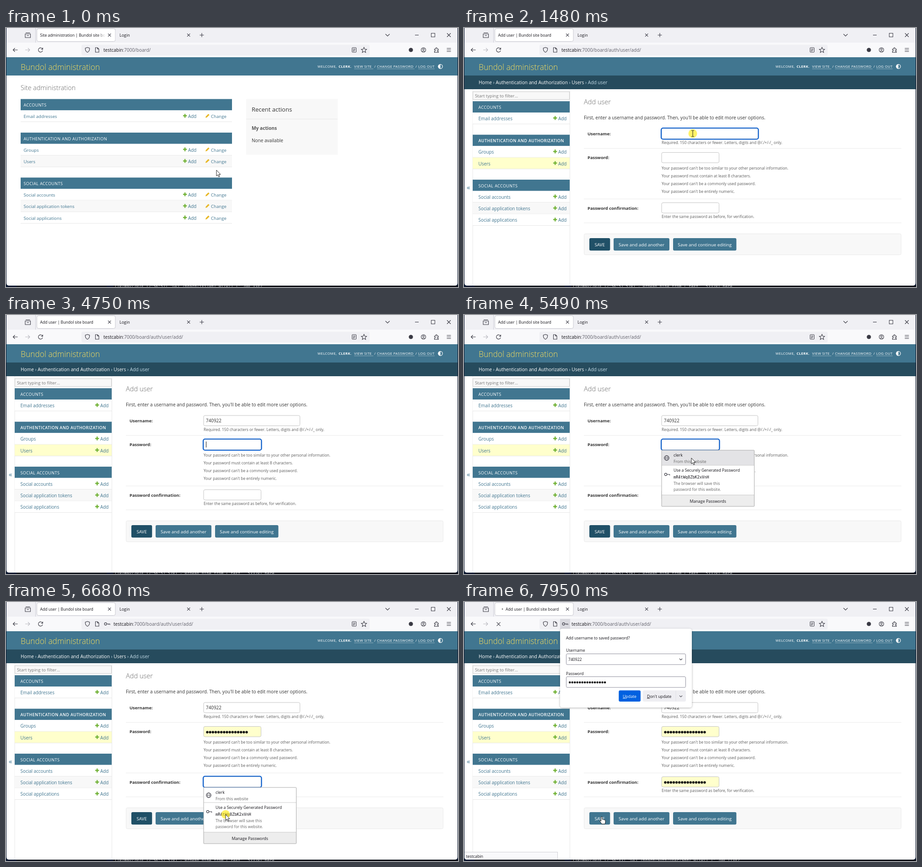
An HTML page that plays this animation: 988x567 px, repeating every 8 s.

```html
<!DOCTYPE html>
<html lang="en">
<head>
<meta charset="utf-8">
<title>Add user</title>
<style>
html, body { margin: 0; width: 100%; height: 100%; overflow: hidden; background: #0b1830; }
svg { display: block; width: 988px; height: 567px; font-family: "Open Sans", "Noto Sans", sans-serif; }
text { white-space: pre; }
.caps { letter-spacing: .38px; }
.mono { font-family: "DejaVu Sans Mono", monospace; }
</style>
</head>
<body>
<svg id="stage" viewBox="0 0 988 567"></svg>
<script>
const LOOP = 8000;
const BLUE = '#417690', DARK = '#264b5d', INK = '#333', ICON = '#3a3a44', FOCUS = '#0a5fd0';
const HOST = 'testcabin', USER = 'clerk', BRAND = 'Bundol', NEW_USER = '740922';

// Markup helpers
const text = (x, y, s, size = 10, fill = INK, attrs = '') =>
  `<text x="${x}" y="${y}" font-size="${size}" fill="${fill}" ${attrs}>${s}</text>`;
const rect = (x, y, w, h, fill, attrs = '') =>
  `<rect x="${x}" y="${y}" width="${w}" height="${h}" fill="${fill}" ${attrs}/>`;
const line = (d, stroke = ICON, width = 1.1, attrs = '') =>
  `<path d="${d}" fill="none" stroke="${stroke}" stroke-width="${width}" ${attrs}/>`;
const ring = (x, y, r, attrs = '') =>
  `<circle cx="${x}" cy="${y}" r="${r}" fill="none" stroke="${ICON}" stroke-width="1.1" ${attrs}/>`;
const group = (id, ...parts) => `<g id="${id}">${parts.join('')}</g>`;
const cross = (x, y, r = 3.2) => line(`M${x - r} ${y - r}l${2 * r} ${2 * r}m0 ${-2 * r}l${-2 * r} ${2 * r}`);
const chevron = (x, y, r = 4) => line(`M${x - r} ${y - r / 2}l${r} ${r}l${r} ${-r}`);
const bold = 'font-weight="700"', light = 'font-weight="300"', middle = 'text-anchor="middle"';

const dots = (x, y, gap, r) => Array.from({ length: 15 }, (_, i) =>
  `<circle cx="${x + i * gap}" cy="${y}" r="${r}" fill="#111"/>`).join('');

const url = path => `<tspan fill="#15141a">${HOST}</tspan>:7000/board/${path}`;

function browserChrome() {
  return [
    rect(1, 0, 986, 32, '#f0f0f4'), rect(1, 32, 986, 32, '#f9f9fb'),
    line('M64.5 0V32', '#cfcfd8', 1),
    rect(67.5, 1.5, 171.5, 28, '#fff', 'rx="3.5" stroke="#c8c8d0" stroke-width="1"'),
    rect(69, 2.5, 1, 26, '#cfe6ff', 'id="burst"'),
    group('tabIndex', text(74.5, 19, `Site administration | ${BRAND} site board`, 8.6, '#15141a'),
      rect(200, 5, 18, 22, 'url(#fade)'), rect(218, 5, 20, 22, '#fff'), rect(239.5, 5, 8, 22, '#f0f0f4')),
    group('tabForm', text(74.5, 19, `Add user | ${BRAND} site board`, 8.6, '#15141a')),
    group('tabLoading', '<circle cx="84" cy="15.5" r="1.4" fill="#777"/>',
      text(91, 19, `Add user | ${BRAND} site board`, 8.6, '#15141a')),
    text(248, 19, 'Login', 9, '#15141a'),
    cross(226.2, 15.5), cross(399.2, 15.5), line('M423.5 15.5h9M428 11v9'),
    line('M43 10.5h9.5M42 13h11.5v8h-11.5zM45.5 16.5h4.5'),
    chevron(834, 15.5, 4.5), line('M894 15.5h8'), rect(929.5, 11.5, 8, 8, 'none', `stroke="${ICON}"`), cross(968, 15.5, 4),
    line('M25.5 48H15.5M19.5 44L15.5 48L19.5 52'),
    line('M42 48H52M48 44L52 48L48 52', '#b9b9c0'),
    group('reload', line('M79.8 46.3A4.7 4.7 0 1 0 80 49.3M80.3 43v3.8h-3.8')),
    group('stop', cross(75.5, 48.3, 4)),
    rect(165, 36.5, 630, 23.5, '#f0f0f4', 'rx="3.5"'),
    line('M178 42.5l4.7 1.7q.2 6.8-4.7 9q-4.9-2.2-4.7-9z'),
    line('M195.5 43h4.5l3 3v7h-7.5zM200 43v3h3'),
    rect(210, 37, 22, 22, '#d9d9df', 'id="keyBack"'),
    group('key', ring(217.7, 48, 2.6), line('M220.3 48h6.7v2.3M224 48v2')),
    text(213, 52.3, '', 10, '#62626c', 'id="url"'),
    rect(756.5, 43, 9, 10, 'none', `stroke="${ICON}" rx="1"`), line('M758.5 46h5M758.5 48.2h5M758.5 50.4h3'),
    line('M782.5 42.3l1.7 3.9 4.2.4-3.2 2.8 1 4.2-3.7-2.2-3.7 2.2 1-4.2-3.2-2.8 4.2-.4z'),
    '<circle cx="885" cy="48" r="4.6" fill="#3a3a44"/>',
    ring(912.5, 48, 5), ring(912.5, 46.5, 1.8), line('M909.3 51.6q3.2-2.6 6.4 0'),
    line('M936.5 46h3q-.8-3 1.3-3t1.3 3h3v3q-2.6-.5-2.6 1.2t2.6 1.2v2.1h-8.6v-2.6q2.3.2 2.3-1.4t-2.3-1.4z'),
    line('M963.5 44.5h9M963.5 48h9M963.5 51.5h9'),
  ].join('');
}

function siteHeader() {
  const small = (x, s, attrs = '') => text(x, 87, s, 7.7, '#fff', `class="caps" ${attrs}`);
  return [
    rect(1, 64, 986, 40, BLUE),
    text(32, 92, `${BRAND} administration`, 17.4, '#f5dd5d', light),
    small(681, 'WELCOME,'), small(727, `${USER.toUpperCase()}.`, bold), small(761, 'VIEW SITE'), small(805, '/'),
    small(811, 'CHANGE PASSWORD'), small(895, '/'), small(901, 'LOG OUT'),
    line('M761 89.5h42M811 89.5h82M901 89.5h36', '#9db9c6', .8),
    '<circle cx="949.5" cy="84.3" r="4.7" fill="none" stroke="#fff" stroke-width="1.2"/>',
    '<path d="M949.5 79.6a4.7 4.7 0 0 0 0 9.4z" fill="#fff"/>',
  ].join('');
}

function module(x, y, width, title, names, { inset, addX, change, current }) {
  let out = rect(x, y, width, 24.7, BLUE) +
    text(x + inset, y + 16.6, title, 9.05, '#fff', `class="caps" ${current ? 'font-weight="600"' : ''}`);
  names.forEach((name, i) => {
    const top = y + 24.7 + i * 25.35, base = top + 17;
    const fill = current === name ? '#ffffcc' : i % 2 ? '#f8f8f8' : '#fff';
    out += rect(x, top, width, 25, fill) + line(`M${x} ${top + 25}h${width}`, '#e6e6e6', 1) +
      text(x + inset, base, name, change ? 9.7 : 9.9, BLUE, change ? 'font-weight="500"' : '') +
      line(`M${addX - 11} ${base - 5}h8.4M${addX - 6.8} ${base - 9.2}v8.4`, '#6aae2c', 2.3) +
      text(addX, base, 'Add', 9.9, BLUE);
    if (change) out += `<path d="M436 ${base - .6}l.9-3.2 5.4-5.4 2.4 2.3-5.5 5.4z" fill="#e8b827"/>` +
      text(448, base, 'Change', 9.6, BLUE);
  });
  return out;
}

function modules(x, tops, width, options, current) {
  return module(x, tops[0], width, 'ACCOUNTS', ['Email addresses'], options) +
    module(x, tops[1], width, 'AUTHENTICATION AND AUTHORIZATION', ['Groups', 'Users'], { ...options, current }) +
    module(x, tops[2], width, 'SOCIAL ACCOUNTS',
      ['Social accounts', 'Social application tokens', 'Social applications'], options);
}

function indexPage() {
  return group('indexPage',
    text(32, 136, 'Site administration', 14.3, '#666', light),
    modules(32, [155.5, 229, 327.4], 462, { inset: 6.5, addX: 398, change: true }),
    rect(525, 155.5, 200, 122, '#f8f8f8'), line('M525 199.3h200', '#e8e8e8', 1),
    text(537, 183, 'Recent actions', 13, INK), text(537, 223.3, 'My actions', 10.2, '#555', bold),
    text(537, 250.3, 'None available', 10));
}

const field = (id, y, width) =>
  rect(432, y + .5, width, 22.5, '#fff', `id="${id}Box" rx="3" stroke="#c4c4c4"`) +
  rect(431, y - .5, width + 2, 24.5, 'none', `id="${id}Focus" rx="4" stroke="${FOCUS}" stroke-width="2.2"`);
const button = (x, width, label, id = '') =>
  rect(x, 460, width, 27.3, BLUE, `rx="3" id="${id}"`) + text(x + width / 2, 478, label, 9.8, '#fff', middle);

function formPage() {
  const label = (y, s) => text(270, y, s, 9.4, INK, bold);
  const help = (y, s) => text(432, y, s, 8.45, '#5c5c5c');
  return group('formPage',
    rect(1, 104, 986, 30, DARK),
    text(32, 123.2, 'Home <tspan fill="#c4dce8">›</tspan> Authentication and Authorization <tspan fill="#c4dce8">›</tspan> Users <tspan fill="#c4dce8">› Add user</tspan>', 10.2, '#fff'),
    line('M19 134V564M231.5 134V564', '#e8e8e8', 1),
    text(6, 354, '«', 15, BLUE),
    rect(19.5, 139.5, 211, 17, '#f8f8f8', 'stroke="#ccc"'), text(24, 151.8, 'Start typing to filter...', 9.6, '#757575'),
    modules(19, [160.3, 233.6, 332], 212, { inset: 12.5, addX: 206 }, 'Users'),
    text(262, 167, 'Add user', 14.6, '#666', light),
    text(262, 200, "First, enter a username and password. Then, you'll be able to edit more user options.", 10.05),
    label(235, 'Username:'), label(287.3, 'Password:'), label(397.6, 'Password confirmation:'),
    help(254, 'Required. 150 characters or fewer. Letters, digits and @/./+/-/_ only.'),
    ["Your password can't be too similar to your other personal information.",
      'Your password must contain at least 8 characters.',
      "Your password can't be a commonly used password.",
      "Your password can't be entirely numeric."].map((s, i) => help(310 + i * 16.9, s)).join(''),
    help(416, 'Enter the same password as before, for verification.'),
    line('M262 263.8H956M262 374.2H956M262 426.6H956', '#eaeaea', 1),
    field('user', 219.5, 210.5), field('pass', 272, 125.5), field('confirm', 382, 125.5),
    text(437, 235, '', 9.9, INK, 'id="typed"'),
    group('passDots', dots(440, 285, 6.14, 2.7)), group('confirmDots', dots(440, 395, 6.14, 2.7)),
    rect(437, 224, 1, 13, '#111', 'id="caret"'),
    rect(262.5, 450.5, 693, 46, '#f8f8f8', 'rx="3" stroke="#eaeaea"'),
    button(274, 45.3, 'SAVE', 'save'), button(327, 122, 'Save and add another'), button(457, 138.4, 'Save and continue editing'));
}

// Suggestion list below a field; rows are stacked in the given order.
function dropdown(id, top, width, rows) {
  const heights = { login: 33, generate: 65, manage: 25 };
  const total = rows.reduce((sum, row) => sum + heights[row], 0);
  let out = rect(432, top, width, total, '#fff'), y = top;
  for (const row of rows) {
    if (row === 'login') out += rect(432.5, y, width - 1, 33, '#e3e3e6', `id="${id}Hover"`) +
      ring(443, y + 17, 5.2) + `<ellipse cx="443" cy="${y + 17}" rx="2.3" ry="5.2" fill="none" stroke="${ICON}" stroke-width=".8"/>` +
      line(`M438 ${y + 17}h10`, ICON, .8) +
      text(458, y + 13.7, USER, 9, '#15141a') + text(458, y + 27.5, 'From this website', 8.7, '#666');
    if (row === 'generate') out += line(`M432 ${y}h${width}`, '#ccc', 1) +
      ring(441, y + 20, 2.6) + line(`M443.6 ${y + 20}h6v2.3`) +
      text(458, y + 14, 'Use a Securely Generated Password', 8.7, '#15141a') +
      text(458, y + 29, 'mR4tWq8ZbK2xVnH', 8.6, '#15141a', 'class="mono"') +
      text(458, y + 43, 'The browser will save this', 8.5, '#666') + text(458, y + 56, 'password for this website.', 8.5, '#666');
    if (row === 'manage') out += rect(432, y, width, 25, '#ededed') + line(`M432 ${y}h${width}`, '#c8c8c8', 1) +
      text(432 + width / 2, y + 16.7, 'Manage Passwords', 8.9, '#15141a', middle);
    y += heights[row];
  }
  return group(id, out, rect(432, top, width, total, 'none', 'stroke="#a9a9a9" rx="1"'));
}

function savePrompt() {
  const box = y => rect(223.5, y, 261, 23.5, '#fff', 'rx="2.5" stroke="#8f8f9d"');
  return group('prompt',
    rect(210, 58.5, 288, 172.5, '#fff', 'rx="5" filter="url(#shadow)"'),
    text(223, 81.6, 'Add username to saved password?', 8.6, '#15141a', 'font-weight="500"'),
    text(223, 109.3, 'Username', 8.6, '#15141a'), box(113.5), text(228, 129, NEW_USER, 8.6, '#15141a'), chevron(474, 125.5, 3),
    text(223, 159.5, 'Password', 8.6, '#15141a'), box(163.5), dots(231.3, 176, 5.48, 2.3),
    rect(338.3, 193.5, 47.7, 24.5, '#0061e0', 'rx="3"'),
    text(362, 209.5, '<tspan text-decoration="underline">U</tspan>pdate', 8.8, '#fff', middle),
    rect(391, 193.5, 94, 24.5, '#eeeef2', 'rx="3"'), line('M463 194v23.5', '#e0e0e6', 1),
    text(400, 209.5, '<tspan text-decoration="underline">D</tspan>on\'t update', 8.8, '#15141a', 'font-weight="500"'),
    chevron(474, 206.3, 3));
}

const stage = document.getElementById('stage');
stage.innerHTML = `<defs>
  <linearGradient id="fade"><stop stop-color="#fff" stop-opacity="0"/><stop offset="1" stop-color="#fff"/></linearGradient>
  <filter id="shadow" x="-10%" y="-10%" width="120%" height="125%"><feDropShadow dx="0" dy="1" stdDeviation="2" flood-opacity=".3"/></filter>
  <clipPath id="window"><path d="M1 0H987V558q0 6-6 6H7q-6 0-6-6z"/></clipPath></defs>` +
  rect(0, 0, 988, 567, '#0b1830') + rect(23, 564, 197, 3, '#15181f') + rect(234, 564, 754, 3, '#0c0f18') +
  text(237, 569, '', 8.8, '#b8b8b8', 'class="mono" id="log"') +
  `<g clip-path="url(#window)">${rect(1, 0, 986, 564, '#fff')}${browserChrome()}${siteHeader()}${indexPage()}${formPage()}` +
  dropdown('userList', 242.5, 210.5, ['login', 'manage']) +
  dropdown('manageList', 243, 210.5, ['manage']) +
  dropdown('passList', 296, 202.5, ['login', 'generate', 'manage']) +
  dropdown('confirmList', 406, 202.5, ['login', 'generate', 'manage']) +
  savePrompt() +
  group('status', rect(.5, 547.5, 204, 18, '#f9f9fb', 'stroke="#cfcfd4"'), text(4.5, 560, HOST, 8.8, '#15141a')) + '</g>' +
  '<circle id="halo" r="9.5" fill="#ffea00" fill-opacity=".6"/>' +
  group('arrow', '<path d="M0 0V13L3 10.3L5 15L7.1 14L5.1 9.6H9Z" fill="#fff" stroke="#111" stroke-width=".9"/>') +
  group('hand', '<path d="M-1.3 1.3a1.3 1.3 0 0 1 2.6 0V6q2-.8 2.4.6q1.8-.6 2.3.6q1.9-.4 2 1.4V12q0 2-1.2 4H.2L-4 9.8q-.6-1.6 1-1.6L-1.3 9.6Z" fill="#fff" stroke="#111" stroke-width=".9"/>') +
  group('beam', line('M-2.8-6.5h2.2L0-6l.6-.5h2.2M0-6V6M-2.8 6.5h2.2L0 6l.6.5h2.2', '#222', 1));

const el = {};
stage.querySelectorAll('[id]').forEach(node => { el[node.id] = node; });
const show = (id, on) => el[id].setAttribute('display', on ? 'inline' : 'none');
const set = (id, attrs) => { for (const k in attrs) el[id].setAttribute(k, attrs[k]); };
const within = (t, ...spans) => spans.some(([a, b]) => t >= a && t < b);

// Pointer stops: time, x, y
const PATH = [[70, 460, 311], [420, 404, 293], [700, 404, 293], [870, 407, 296], [940, 407, 296], [1280, 500, 231],
  [5290, 500, 231], [5490, 497, 313], [5630, 497, 313], [5770, 492, 350], [5860, 492, 350], [6120, 487, 391.5],
  [6250, 487, 391.5], [6560, 480, 465], [6780, 480, 465], [7290, 301, 470]];
// Number of typed characters from each time on
const KEYS = [[0, 0], [2680, 1], [2890, 2], [3160, 3], [3430, 2], [3500, 3], [3790, 4], [3950, 5], [4090, 6]];

function pointerAt(t) {
  const next = PATH.findIndex(p => p[0] > t);
  if (next === 0) return PATH[0].slice(1);
  if (next < 0) return PATH.at(-1).slice(1);
  const [t0, x0, y0] = PATH[next - 1], [t1, x1, y1] = PATH[next];
  const u = (t - t0) / (t1 - t0), e = u * u * (3 - 2 * u);
  return [x0 + (x1 - x0) * e, y0 + (y1 - y0) * e];
}

function render(t) {
  const form = t >= 670, loading = t >= 7680, saved = t >= 5840, confirmed = t >= 6740;
  show('indexPage', !form); show('formPage', form);
  show('tabIndex', !form); show('tabForm', form && !loading); show('tabLoading', loading);
  show('reload', !loading); show('stop', loading);
  show('key', saved); show('keyBack', t >= 7820); show('prompt', t >= 7820); show('status', loading);
  el.url.innerHTML = url(form ? 'auth/user/add/' : '');
  set('url', { x: saved ? 235 : 213 });
  el.log.textContent = t >= 7880 ? '[18/May/2024 12:56:43] "GET /board/auth/user/add/ HTTP/1.1" 200 11342'
    : form ? "[18/May/2024 12:56:57,528] - Broken pipe from ('test', 53328) here"
    : '[18/May/2024 12:56:57] "GET /board/jsi18n/ HTTP/1.1" 200 3342';

  show('burst', within(t, [800, 1280]));
  set('burst', { width: Math.max(1, Math.min(169, (t - 800) * 1.57)), opacity: Math.max(0, Math.min(1, (1280 - t) / 400)) });

  const inUser = within(t, [800, 4750]), inPass = within(t, [4750, 6120]);
  show('userFocus', inUser); show('passFocus', inPass); show('confirmFocus', within(t, [6120, 7490]));
  show('passDots', saved); show('confirmDots', confirmed);
  set('passBox', { fill: saved ? '#ffffcc' : '#fff' });
  set('confirmBox', { fill: confirmed ? '#ffffcc' : '#fff' });
  el.typed.textContent = NEW_USER.slice(0, KEYS.findLast(k => k[0] <= t)[1]);
  show('caret', within(t, [800, 1280], [1810, 2350], [2680, 4490], [4750, 5290], [6120, 6640]));
  set('caret', {
    x: 437 + (inUser && t >= 2680 ? el.typed.getComputedTextLength() : 0),
    y: inUser ? 224 : inPass ? 277 : 387,
  });

  show('userList', within(t, [800, 1480])); show('manageList', within(t, [2750, 4750]));
  show('passList', within(t, [4820, 5840])); show('confirmList', within(t, [6220, 6740]));
  show('userListHover', false);
  show('passListHover', within(t, [5420, 5690])); show('confirmListHover', within(t, [6350, 6420]));
  set('save', { fill: t >= 7220 ? BLUE : '#205067' });

  const [x, y] = pointerAt(t);
  const kind = within(t, [2680, 5290]) ? '' : within(t, [300, 670], [6900, LOOP]) ? 'hand'
    : within(t, [1140, 5400], [6000, 6330]) ? 'beam' : 'arrow';
  for (const id of ['arrow', 'hand', 'beam']) {
    show(id, id === kind);
    set(id, { transform: `translate(${x} ${y})` });
  }
  show('halo', within(t, [430, 560], [1480, 1610], [5770, 5860], [6120, 6250], [6640, 6740], [7490, 7680]));
  set('halo', { cx: x, cy: y });
}

function frame() {
  render(performance.now() % LOOP);
  requestAnimationFrame(frame);
}
frame();
</script>
</body>
</html>
```
